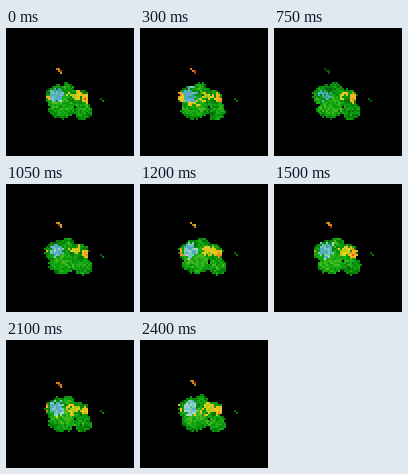
Write an HTML page with a canvas that moves like this. It is 128 by 128 pixels and loops after 2550 ms.

```html
<!DOCTYPE html>
<html lang="en">
<head>
<meta charset="utf-8">
<title>Pixel cloud</title>
<style>
html, body { margin: 0; width: 100%; height: 100%; overflow: hidden; background: #000; }
canvas { display: block; width: 100vmin; height: 100vmin; image-rendering: pixelated; }
</style>
</head>
<body>
<canvas id="stage" width="128" height="128"></canvas>
<script>
const ctx = document.getElementById('stage').getContext('2d');
const STEP = 150, STEPS = 17, CELL = 2;

// step, dx, dy, cool light, yellow, left rim
const poses = [
  [0, 0, 0, 0.55, 0.75, 0.45],
  [2, -1, 0, 0.4, 0.6, 0.9],
  [5, 0, -1, 0.2, 0.35, 0.15],
  [8, 0, -2, 0.85, 0.8, 0.5],
  [10, 1, -2, 0.7, 0.75, 0.35],
  [12, -0.5, 1, 0.7, 0.75, 0.6],
  [13, 0, 1.5, 0.65, 0.7, 0.5],
  [16, -0.5, 0, 0.85, 0.8, 0.55],
  [17, 0, 0, 0.55, 0.75, 0.45]
];

// cx, cy, rx, ry
const lobes = [
  [53, 69, 14, 12],
  [62, 62, 7, 7],
  [72, 70, 11, 9],
  [56, 82, 14, 9],
  [77, 83, 9, 9]
];

const greens = ['#044a04', '#066806', '#088408', '#0c9c10', '#1cae18', '#4cba1c'];
const cools = ['#188a78', '#2fa58c', '#4ab4b4', '#5aa8c4', '#7cc8bc', '#a4d8c8'];
const warms = ['#86b814', '#b4c818', '#dcd41c', '#f0b81c', '#f48c1c', '#e84c24'];

const mix = (a, b, k) => a + (b - a) * k;
const clamp = v => Math.max(0, Math.min(1, v));
const pick = (ramp, v) => ramp[Math.min(ramp.length - 1, Math.floor(clamp(v) * ramp.length))];

function hash(x, y, z) {
  let h = Math.imul(x, 374761393) ^ Math.imul(y, 668265263) ^ Math.imul(z + 7, 1274126177);
  h = Math.imul(h ^ (h >>> 13), 1103515245);
  h = Math.imul(h ^ (h >>> 16), 2246822519);
  return ((h ^ (h >>> 15)) >>> 0) / 4294967296;
}

function smooth(x, y, z) {
  const i = Math.floor(x), j = Math.floor(y), u = x - i, v = y - j;
  return mix(mix(hash(i, j, z), hash(i + 1, j, z), u),
             mix(hash(i, j + 1, z), hash(i + 1, j + 1, z), u), v);
}

const spot = (x, y, cx, cy, rx, ry) =>
  Math.exp(-(((x - cx) / rx) ** 2) - ((y - cy) / ry) ** 2);

function poseAt(step) {
  const i = poses.findIndex(p => p[0] > step);
  const a = poses[i - 1], b = poses[i];
  const k = (step - a[0]) / (b[0] - a[0]);
  return a.slice(1).map((v, n) => mix(v, b[n + 1], k));
}

function cell(x, y, color) {
  ctx.fillStyle = color;
  ctx.fillRect(Math.round(x / CELL) * CELL, Math.round(y / CELL) * CELL, CELL, CELL);
}

function cloudColor(x, y, i, j, step, cool, yellow, rim, depth) {
  const grain = mix(hash(i, j, 50), hash(i, j, step), 0.6);
  const patch = mix(smooth(i / 3, j / 3, 80), smooth(i / 3, j / 3, step + 100), 0.5);
  const n = grain * 0.6 + patch * 0.4 - 0.5;
  const hot = Math.max(
    spot(x, y, 69, 69, 9, 7) * (0.35 + yellow * 0.6),
    spot(x, y, 79, 70, 4, 5) * 1.05,
    spot(x, y, 41, 69, 4, 7) * rim * 1.1,
    spot(x, y, 54, 76, 9, 4) * rim * 0.75);
  const cold = spot(x, y, 51, 67, 9, 9) * (0.65 + cool * 0.4);
  if (cold + n * 0.9 > 0.53 && cold > hot * 0.9)
    return pick(cools, cool * 0.55 + n * 1.1 + 0.2);
  if (hot + n > 0.52) {
    const red = spot(x, y, 79, 69, 4, 5) * 0.35 + spot(x, y, 41, 69, 5, 8) * 0.25;
    return pick(warms, 0.3 + n * 0.9 + red);
  }
  const light = spot(x, y, 58, 75, 19, 13) * (0.2 + cool * 0.2);
  return pick(greens, 0.38 + n * 1.1 + light + Math.min(depth, 0.4) * 0.2);
}

function drawCloud(step, [dx, dy, cool, yellow, rim]) {
  for (let j = 24; j < 48; j++) {
    for (let i = 17; i < 46; i++) {
      const x = i * CELL + 1 - dx, y = j * CELL + 1 - dy * 0.5;
      const depth = Math.max(...lobes.map(([cx, cy, rx, ry]) =>
        1 - Math.hypot((x - cx) / rx, (y - cy) / ry)));
      const edge = mix(hash(i, j, 30), hash(i, j, step + 40), 0.4) - 0.5;
      if (depth + edge * 0.28 < 0) continue;
      cell(i * CELL, j * CELL, cloudColor(x, y, i, j, step, cool, yellow, rim, depth));
    }
  }
}

function drawSparks(step, [dx, dy, cool, yellow]) {
  const bright = yellow > 0.5;
  const tones = bright ? ['#b88418', '#e07c1c', '#d8a020', '#a83c14']
                       : ['#0a5c0a', '#4c7410', '#0c700c', '#064806'];
  [[50, 40], [52, 40], [52, 42], [54, 42], [54, 44]].forEach(([x, y], n) => {
    if (n === 1 && hash(n, 3, step) < 0.4) return;
    cell(x + dx, y + dy, tones[Math.floor(hash(n, 9, step) * tones.length)]);
  });
  cell(94 + dx, 70 + dy * 0.6, '#0a640c');
  cell(96 + dx, 72 + dy * 0.6, bright ? '#0c8010' : '#064c06');
}

let last = -1;
function frame(now) {
  const step = Math.floor(now / STEP) % STEPS;
  if (step !== last) {
    last = step;
    ctx.fillStyle = '#000';
    ctx.fillRect(0, 0, 128, 128);
    const pose = poseAt(step);
    drawCloud(step, pose);
    drawSparks(step, pose);
  }
  requestAnimationFrame(frame);
}
frame(0);
</script>
</body>
</html>
```
